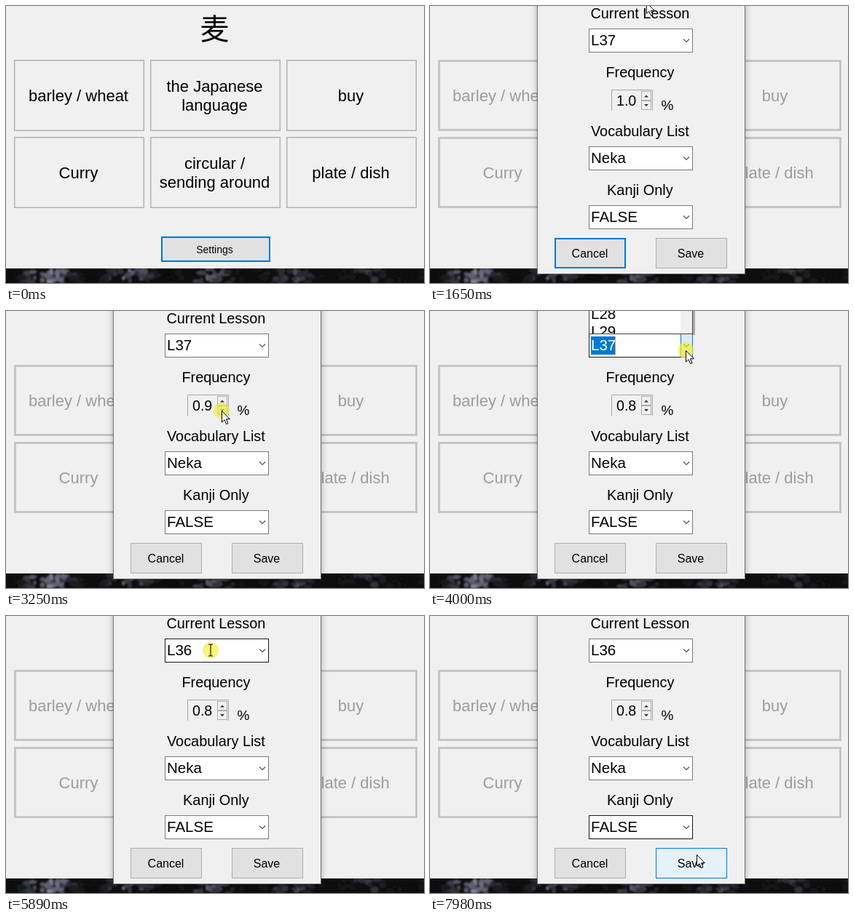
Write an HTML page that moves like this. It is 574 px wide and 381 px high and loops after 8000 ms.

```html
<!DOCTYPE html>
<html lang="en">
<head>
<meta charset="utf-8">
<title>Vocabulary quiz settings</title>
<style>
  html, body { margin: 0; width: 100%; height: 100%; overflow: hidden; background: #f0f0f0; }
  svg { display: block; width: 100%; height: 100%; }
  text { font-family: "Liberation Sans", Arial, sans-serif; white-space: pre; }
  rect { shape-rendering: crispEdges; }
  .cjk { font-family: "Noto Sans CJK JP", "Noto Sans CJK", sans-serif; }
</style>
</head>
<body>
<svg id="stage" viewBox="0 0 574 381"></svg>
<script>
const LOOP = 8000, OPEN = 50, DROP = 3950, PICK = 4890, LEAVE = 6680;
const CLICKS = [3150, 3400, DROP, 5750];
const BLUE = '#0078d7', GREY = '#adadad', FACE = '#f0f0f0', BUTTON = '#e1e1e1';
const PITCH = 81, ROW = 24;

// Markup helpers
const box = (x, y, w, h, fill, stroke = 'none', sw = 0, more = '') =>
  `<rect x="${x + sw / 2}" y="${y + sw / 2}" width="${w - sw}" height="${h - sw}" fill="${fill}" stroke="${stroke}" stroke-width="${sw}" ${more}/>`;
const text = (s, x, y, size, more = '') =>
  `<text x="${x}" y="${y}" font-size="${size}" ${more}>${s}</text>`;
const mid = (s, x, y, size, more = '') => text(s, x, y, size, 'text-anchor="middle" ' + more);
const line = (d, color, w) => `<path d="${d}" fill="none" stroke="${color}" stroke-width="${w}"/>`;
const chevron = y => line(`M348 ${y}l4 4l4 -4`, '#505050', 1.1);

const answers = [
  ['barley / wheat'], ['the Japanese', 'language'], ['buy'],
  ['Curry'], ['circular /', 'sending around'], ['plate / dish']
];

function answerGrid(disabled) {
  return answers.map((lines, i) => {
    const x = 11 + i % 3 * 187, y = 74 + Math.floor(i / 3) * 106;
    const frame = disabled
      ? box(x, y, 180, 98, FACE, '#c5c5c5', 3)
      : box(x, y, 179, 98, FACE, GREY, 1) + box(x + 1, y + 1, 177, 96, 'none', '#d4d4d4', 1);
    const first = y + 57 - (lines.length - 1) * 13;
    return frame + lines.map((s, k) =>
      mid(s, x + 88.5, first + k * 26, 22, `fill="${disabled ? '#9c9c9c' : '#000'}"`)).join('');
  }).join('');
}

// Dark cobbles below the window, lit in waves that fade to the right
function backdrop() {
  let seed = 29;
  const rnd = () => (seed = seed * 16807 % 2147483647) / 2147483647;
  let stones = '';
  for (let i = 0; i < 210; i++) {
    const x = rnd() * 574, y = 361 + rnd() * 20;
    const glow = (.5 + .5 * Math.cos((x - 60) / 110 * 2 * Math.PI)) * (1 - x / 900);
    const light = 5 + 45 * glow * (.4 + .8 * rnd());
    stones += `<ellipse cx="${x.toFixed(1)}" cy="${y.toFixed(1)}" rx="${2 + rnd() * 5}" ry="${2 + rnd() * 3}" fill="hsl(235 9% ${light}%)"/>`;
  }
  return `<g clip-path="url(#strip)">${box(0, 361, 574, 20, '#100d0e')}<g filter="url(#soft)">${stones}</g></g>`;
}

const combo = (value, i) => {
  const y = 31 + i * PITCH;
  const extras = box(344, y, 17, 33, '#d8eafa', BLUE, 1, 'id="drop"') +
    box(221, y + 4, 34, 25, BLUE, 'none', 0, 'id="mark"') +
    box(254, y + 4, 1, 25, '#ff9a28', 'none', 0, 'id="caret"');
  return box(218, y, 143, 33, '#fff', '#7a7a7a', 1, `id="combo${i}"`) + (i ? '' : extras) +
    text(value, 221, y + 23, 20.5, `id="value${i}"`) + chevron(y + 14.5);
};
// The list of lessons has its own row; the frequency row sits between the first two lists
const lists = [['L37', 0], ['Neka', 2], ['FALSE', 3]];
const comboTop = row => 31 + row * PITCH;

const dialog = () =>
  box(147, -20, 286, 389, FACE, 'none', 0, 'filter="url(#shadow)"') +
  box(147, -20, 286, 389, FACE, '#6e6e6e', 1) +
  ['Current Lesson', 'Frequency', 'Vocabulary List', 'Kanji Only']
    .map((s, i) => mid(s, 288.4, 17 + i * PITCH, 19.9)).join('') +
  lists.map(([value, row]) => combo(value, row)).join('') +
  line('M249.5 144V115.5H305.5V144', '#a5a5a5', 1) +
  text('1.0', 256, 137, 19.6, 'id="rate"') +
  box(290, 117, 14, 13, FACE, '#acacac', 1, 'id="up"') +
  box(290, 130, 14, 13, FACE, '#acacac', 1, 'id="down"') +
  '<path d="M294 125.5l3 -3l3 3zM294 135l3 3l3 -3z" fill="#333"/>' +
  text('%', 317.5, 142.5, 19) +
  box(171, 319, 98, 42, BUTTON, GREY, 1) +
  box(171, 319, 98, 42, 'none', BLUE, 2, 'id="focus"') + mid('Cancel', 219.5, 346, 16) +
  box(310, 319, 98, 42, BUTTON, GREY, 1, 'id="save"') + mid('Save', 358, 346, 16) +
  '<g id="popup"></g>';

document.getElementById('stage').innerHTML = `
  <defs>
    <clipPath id="strip"><rect x="0" y="361" width="574" height="20"/></clipPath>
    <clipPath id="list"><rect x="218" y="0" width="143" height="31"/></clipPath>
    <filter id="soft"><feGaussianBlur stdDeviation=".8"/></filter>
    <filter id="shadow" x="-10%" y="-10%" width="120%" height="120%">
      <feDropShadow dx="0" dy="2" stdDeviation="4.5" flood-color="#000" flood-opacity=".3"/>
    </filter>
  </defs>
  ${box(0, 0, 574, 361, FACE)}${backdrop()}
  <g id="quiz">
    ${mid('麦', 286.5, 46, 40, 'class="cjk" lang="ja"')}${answerGrid(false)}
    ${box(213, 317, 150, 35, BUTTON, BLUE, 2)}${mid('Settings', 286.5, 340, 14)}
  </g>
  <g id="settings">
    ${answerGrid(true)}${dialog()}
    <circle id="click" r="11" fill="#f8ee30" opacity=".65"/>
    <path id="arrow" d="M0.5 0.5V16L4 12.6L6.6 18.6L9 17.5L6.4 11.7H11.3Z" fill="#fff" stroke="#000"/>
    <path id="beam" d="M-3 -8H-1L0 -7L1 -8H3M0 -7V7M-3 8H-1L0 7L1 8H3" fill="none" stroke="#000" stroke-width="1.1"/>
  </g>`;

const el = {};
document.querySelectorAll('[id]').forEach(n => el[n.id] = n);
const show = (n, on) => n.setAttribute('display', on ? 'inline' : 'none');
const paint = (n, fill, stroke) => { n.setAttribute('fill', fill); n.setAttribute('stroke', stroke); };
const move = (n, [x, y]) => n.setAttribute('transform', `translate(${x.toFixed(2)} ${y.toFixed(2)})`);

// Places the pointer visits, each with arrival and departure time
const stops = [
  [OPEN, OPEN, 290, 338], [800, 800, 302, 186], [1350, 1600, 297, -22],
  [2050, 2450, 295, 124], [3050, 3400, 296, 137], [3900, 4050, 351, 54],
  [4650, 4650, 346, -22], [5360, 5360, 262, -22], [5610, 6630, 281, 47],
  [6930, 6930, 282, 209], [7430, 7430, 300, 291], [7750, 7750, 312, 297],
  [7980, LOOP, 366, 328]
];

function pointer(t) {
  const i = Math.max(1, stops.findIndex(s => t <= s[1]));
  const [, leave, x0, y0] = stops[i - 1], [arrive, , x1, y1] = stops[i];
  const k = Math.min(1, Math.max(0, (t - leave) / (arrive - leave)));
  return [x0 + (x1 - x0) * k, y0 + (y1 - y0) * k];
}
const inside = ([x, y], l, t, w, h) => x >= l && x < l + w && y >= t && y < t + h;

// The list unrolls upwards until its last row rests on the combo box
function drawPopup(t) {
  const slide = Math.max(0, 1 - (t - DROP) / 200) * 690;
  let rows = '';
  for (let n = 25; n <= 50; n++) {
    const y = 25 + slide - (50 - n) * ROW;
    if (y > -10 && y < 60) rows += text('L' + n, 221, y, 20.5);
  }
  el.popup.innerHTML =
    box(361, 0, 3, 33, '#000', 'none', 0, 'opacity=".28"') +
    `<g clip-path="url(#list)">${box(218, 0, 143, 31, '#fff')}${rows}` +
    box(344, 0, 16, 31, FACE) + box(344, slide - 60, 15, 73, '#cdcdcd') +
    chevron(19.5 + slide) + '</g>' +
    line('M218.5 0V31.5H360.5V0', slide ? '#444' : BLUE, 1);
}

function draw(t) {
  const opened = t >= OPEN;
  show(el.quiz, !opened);
  show(el.settings, opened);
  if (!opened) return;

  const p = pointer(t), before = pointer(t - 200);
  const open = t >= DROP && t < PICK;
  const selected = t >= DROP && t < CLICKS[3];

  for (const [, row] of lists) {
    const hot = inside(before, 218, comboTop(row), 143, 33);
    const focused = row === 0 && t >= DROP && t < LEAVE;
    el['combo' + row].setAttribute('stroke', hot || focused ? '#1a1a1a' : '#7a7a7a');
  }
  show(el.drop, open || inside(p, 344, 31, 17, 33));
  show(el.mark, selected);
  show(el.caret, selected);
  el.value0.setAttribute('fill', selected ? '#fff' : '#000');
  el.value0.textContent = t < PICK ? 'L37' : 'L36';

  const steps = CLICKS.filter(c => c < DROP && c <= t).length;
  el.rate.textContent = (1 - steps / 10).toFixed(1);
  [el.up, el.down].forEach((n, i) => {
    const hot = inside(p, 290, 117 + i * 13, 14, 13);
    paint(n, hot ? '#cfe6f8' : FACE, hot ? '#7eb4ea' : '#acacac');
  });

  show(el.focus, !steps);
  const onSave = inside(p, 310, 319, 98, 42);
  paint(el.save, onSave ? '#e5f1fb' : BUTTON, onSave ? BLUE : GREY);

  show(el.popup, open);
  if (open) drawPopup(t);

  show(el.click, CLICKS.some(c => t >= c && t < c + 150));
  move(el.click, p);

  const typing = !open && (lists.some(([, row]) => inside(p, 219, comboTop(row), 125, 33)) || inside(p, 250, 116, 40, 28));
  show(el.arrow, !typing);
  show(el.beam, typing);
  move(typing ? el.beam : el.arrow, p);
}

function tick() {
  draw(performance.now() % LOOP);
  requestAnimationFrame(tick);
}
tick();
</script>
</body>
</html>
```
